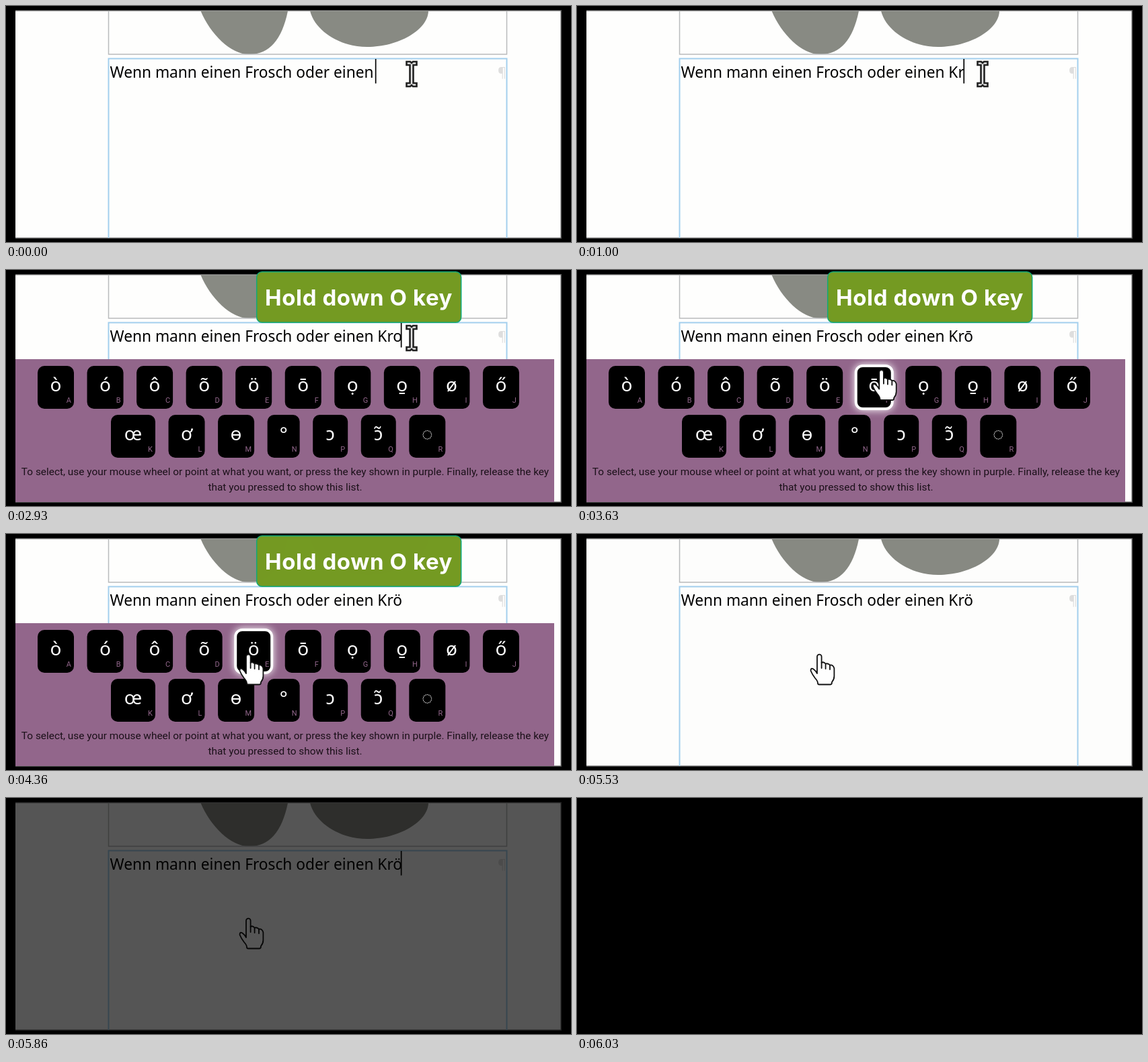
These frames come from a looping animation (840 px wide and 352 px high, 6530 ms). An HTML page:

```html
<!DOCTYPE html>
<html lang="en">
<head>
<meta charset="utf-8">
<title>Special characters by holding a key</title>
<style>
  html, body { margin: 0; width: 100%; height: 100%; overflow: hidden; background: #000; }
  svg { display: block; width: 840px; height: 352px; }
  .body { font: 22.7px "Noto Sans", sans-serif; }
  .badge { font: 700 33px Inter, sans-serif; letter-spacing: .6px; fill: #fff; }
  .glyph { font: 500 28px "Noto Sans", sans-serif; fill: #fff; text-anchor: middle; }
  .letter { font: 11px Roboto, sans-serif; fill: #92668b; text-anchor: end; }
  .help { font: 15.4px Roboto, sans-serif; fill: #1b1019; text-anchor: middle; }
  .key.on { filter: drop-shadow(0 0 6px #fff); }
  .key.on rect { stroke: #fff; stroke-width: 4; }
</style>
</head>
<body>
<svg viewBox="0 0 840 352">
  <rect width="840" height="352"/>
  <rect x="14" y="6" width="812" height="341" fill="#555"/>
  <rect x="14" y="7.5" width="810.5" height="338" fill="#fefefd"/>
  <g fill="#888a83">
    <path d="M289.500 7.5C304 42 334 72 361 72C390 73 410 52 419 7.5Z"/>
    <path d="M452 7.5C460 38 497 61 537 61C583 61 627 36 628 7.5Z"/>
  </g>
  <path d="M152.5 7.5V72H744.5V7.5" fill="none" stroke="#b9bbbd" stroke-width="1.5"/>
  <path d="M152.5 346V78.5H744.5V346" fill="none" stroke="#a3cfee" stroke-width="2"/>
  <text class="body" id="line" x="154.5" y="107" xml:space="preserve"></text>
  <text class="body" x="744" y="106" fill="#dedede" text-anchor="end" style="font-size:20px">¶</text>
  <rect id="caret" y="79" width="1.7" height="36.5"/>
  <g id="panel">
    <rect x="14" y="133" width="801" height="213" fill="#92668b"/>
    <g id="keys"></g>
    <text class="help" x="415" y="306">To select, use your mouse wheel or point at what you want, or press the key shown in purple. Finally, release the key</text>
    <text class="help" x="415" y="329">that you pressed to show this list.</text>
  </g>
  <g id="badge">
    <rect x="372.7" y="2.7" width="304" height="75.6" rx="8" fill="#749a22" stroke="#10a878" stroke-width="1.5"/>
    <text class="badge" x="385" y="53">Hold down O key</text>
  </g>
  <path id="beam" fill="#e2e2e2" stroke="#222" stroke-width="2.6"
    d="M-7.5-19H-2L0-17L2-19H7.5V-14H2.5V13H7.5V18H2L0 16L-2 18H-7.5V13H-2.5V-14H-7.5Z"/>
  <g id="hand" fill="#fff" stroke="#111" stroke-width="1.8" stroke-linejoin="round" stroke-linecap="round">
    <path d="M-4 26V1a3.3 3.3 0 0 1 6.6 0V10q3-2 6 1.5q4-1 6.4 2q5-.5 6.4 5V30q0 5-3.5 9V40q0 2.5-2.5 2.5H-1q-2 0-2-2q0-3-4-7.5q-4-5-6.5-11q0-5 4-2.5q3 2 5.5 6.5Z"/>
    <path d="M2.6 10v8M8.6 12v7M15 14v6" fill="none"/>
  </g>
  <rect id="shade" width="840" height="352"/>
</svg>
<script>
const LOOP = 6530;
const el = id => document.getElementById(id);
const show = (id, on) => el(id).style.display = on ? '' : 'none';
const ramp = (t, a, b) => Math.min(1, Math.max(0, (t - a) / (b - a)));

const keys = [];
function addRow(glyphs, letters, x, y, widths) {
  glyphs.forEach((glyph, i) => {
    const w = widths[i] || 54;
    const node = document.createElementNS('http://www.w3.org/2000/svg', 'g');
    node.setAttribute('class', 'key');
    node.innerHTML = `<rect x="${x}" y="${y}" width="${w}" height="64" rx="10"/>
      <text class="glyph" x="${x + w / 2}" y="${y + 38}">${glyph}</text>
      <text class="letter" x="${x + w - 4}" y="${y + 55}">${letters[i]}</text>`;
    el('keys').append(node);
    keys.push({ glyph, x, y, w, node });
    x += w + 19.55;
  });
}
addRow(['ò', 'ó', 'ô', 'õ', 'ö', 'ō', 'ọ', 'o\u0331', 'ø', 'ő'], 'ABCDEFGHIJ', 47, 143, []);
addRow(['œ', 'ơ', 'ɵ', '°', 'ɔ', 'ɔ\u0303', '◌'], 'KLMNPQR', 156, 216, [66, 54, 54, 48, 52, 52]);

function caretOn(t) {
  return t < 2400 || t >= 2930 && t < 3460 || t >= 4670 && t < 5200 || t >= 5700;
}

function draw(t) {
  // pointer
  const p = ramp(t, 3260, 3900), ease = p * p * (3 - 2 * p);
  const x = 603 - 242 * ease, y = 102 + 80 * ease;
  const overPanel = y > 133;
  for (const id of ['beam', 'hand']) el(id).setAttribute('transform', `translate(${x} ${y})`);
  show('beam', !overPanel);
  show('hand', overPanel);

  // key list
  const open = t >= 2400 && t < 4400;
  show('panel', open);
  let picked = t >= 4400 ? 'ö' : 'o';
  for (const k of keys) {
    const on = open && x >= k.x && x <= k.x + k.w && y >= k.y && y <= k.y + 64;
    k.node.classList.toggle('on', on);
    if (on) picked = k.glyph;
  }

  // typing
  const typed = [60, 1000, 1500].filter(at => t >= at).length;
  el('line').textContent = 'Wenn mann einen Frosch oder einen ' + ('Kr' + picked).slice(0, typed < 3 ? typed : undefined);
  el('caret').setAttribute('x', [548.8, 563.8, 574.4, 586.8][typed]);
  show('caret', caretOn(t));

  el('badge').style.opacity = ramp(t, 1500, 1860) - ramp(t, 4360, 4700);
  el('shade').style.opacity = ramp(t, 5530, 6030);
}

function frame() {
  draw(performance.now() % LOOP);
  requestAnimationFrame(frame);
}
frame();
</script>
</body>
</html>
```
